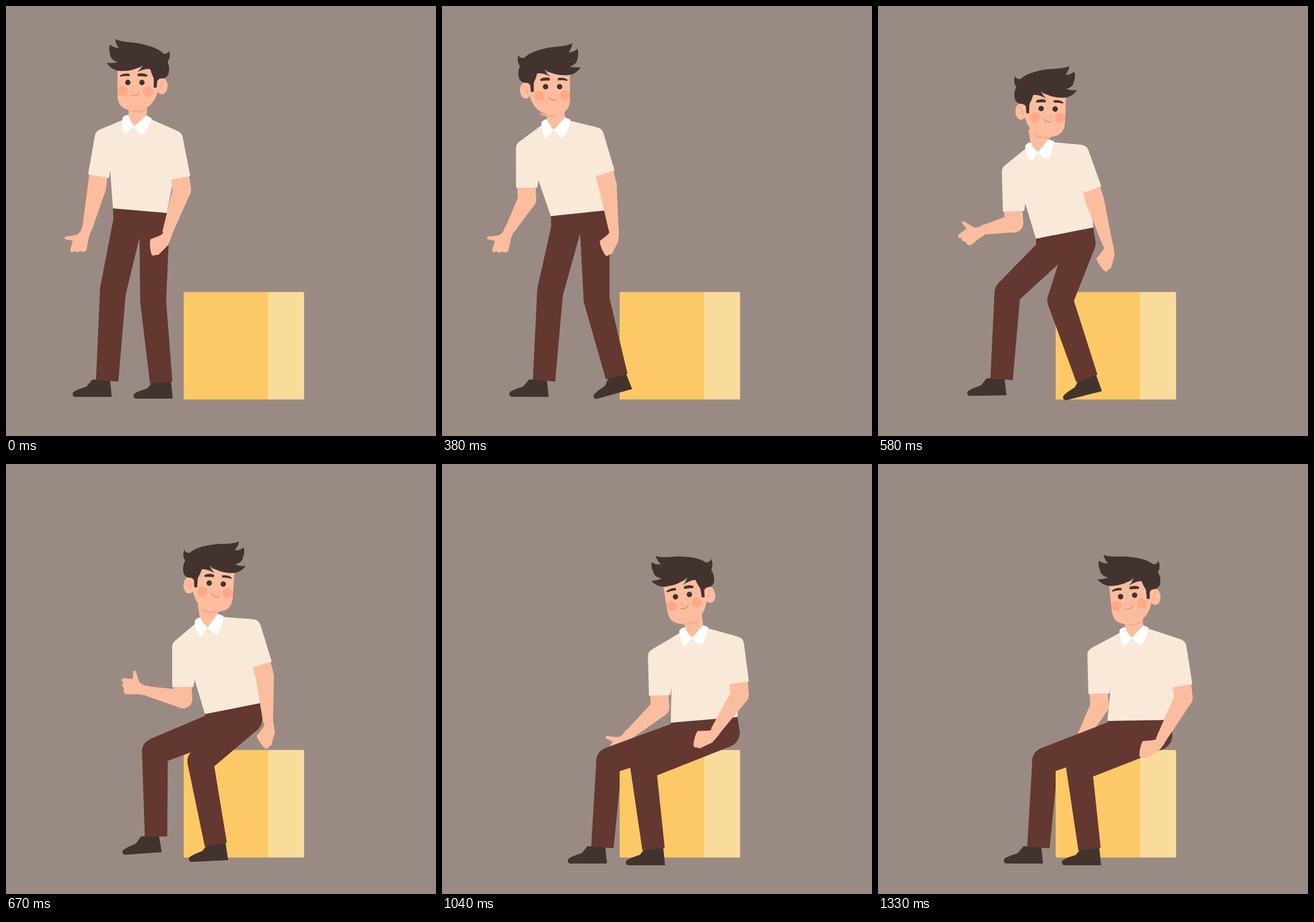
An HTML page with a canvas for the animation above (1.37 s loop, 748 by 748 pixels).

```html
<!DOCTYPE html>
<html lang="en">
<head>
<meta charset="utf-8">
<title>Sitting down</title>
<style>
  html, body { margin: 0; height: 100%; overflow: hidden; background: #998b83; }
  canvas { display: block; width: 100vw; height: 100vh; }
</style>
</head>
<body>
<canvas id="stage" width="748" height="748"></canvas>
<script>
const ctx = document.getElementById('stage').getContext('2d');
const LOOP = 1370, FPS = 24;
const SKIN = '#fcbd9f', BLUSH = '#fda988', SHIRT = '#f8e9d9', PANTS = '#623831', DARK = '#42332f';
const KEYS = [0, 5, 8, 12, 16, 20, 25, 32];

// Monotone cubic through one value per key
function curve(values) {
  const slope = values.slice(1).map((v, i) => (v - values[i]) / (KEYS[i + 1] - KEYS[i]));
  const tangent = values.map((_, i) => {
    const a = slope[i - 1] || 0, b = slope[i] || 0;
    return a * b > 0 ? 2 * a * b / (a + b) : 0;
  });
  return k => {
    let i = 0;
    while (i < KEYS.length - 2 && k >= KEYS[i + 1]) i++;
    const h = KEYS[i + 1] - KEYS[i], u = (k - KEYS[i]) / h, w = 1 - u;
    return values[i] * (1 + 2 * u) * w * w + values[i + 1] * u * u * (3 - 2 * u)
      + h * u * w * (tangent[i] * w - tangent[i + 1] * u);
  };
}
const track = (...channels) => {
  const curves = channels.map(curve);
  return k => curves.map(c => c(k));
};

// Channels: x, y and, where a part turns, its angle in degrees
const head = track([224, 201, 190, 222.5, 366, 387.5, 418, 434], [133, 133, 138, 152, 208, 230.5, 229, 229.5], [0, 0, 0, 0, 4, -12, -9.5, -6]);
const collar = track([222, 203, 192, 215, 350, 404, 434, 441], [209, 209, 213, 226, 284, 300, 302, 302], [3, 0, -3, -7, -9, -8, -5, -4]);
const shoulderL = track([156, 136, 127, 150, 289, 339, 358, 364], [218, 229, 237, 253, 312, 335, 327, 324], [-10, -3, -1, 3, 0, 2.5, 1.5, 1.5]);
const shoulderR = track([306, 286, 277, 297, 440, 495, 524, 535], [221, 214, 213, 219, 271, 295, 303, 308], [11, 12, 15, 21, 17, 8.5, 7.5, 9]);
const hemL = track([186, 182, 186, 211, 346, 396, 398, 399], [352, 358, 363, 377, 435, 457, 450, 447]);
const hemR = track([280, 277, 283, 316, 442, 510, 514, 508], [360, 355, 355, 359, 416, 432, 440, 445]);
const wristL = track([141, 129, 116, 137, 245, 301, 326, 350], [388, 389, 390, 386, 395, 416, 470, 485], [0, 2, 2, 2, 80, 80, 15, 0]);
const wristR = track([280, 287, 293, 338, 456, 480, 475, 491], [396, 392, 391, 392, 450, 478, 465, 481], [0, -8, -14, -28, -30, -13, 20, 17]);
const kneeL = track([186, 186, 187, 197, 259, 288, 291, 291], [496, 496, 497, 498, 500, 508, 516, 516]);
const kneeR = track([256, 256, 264, 292, 338, 350, 350, 350], [514, 514, 512, 508, 517, 520, 527, 529]);
const ankleL = track([176, 176, 177, 180, 261, 297, 279, 279], [652, 652, 652, 651, 648, 659, 667, 667], [0, 0, 0, 1, -4, -8, 0, 0]);
const ankleR = track([270, 270, 288, 360, 365, 367, 368, 368], [655, 655, 648, 636, 662, 668, 670, 670], [0, 0, -12, -24, -3, 0, 0, 0]);

const shape = d => new Path2D(d);
const SHOE = shape('M-14-2H17L20 28H-44Q-49 27-48 21Q-46 17-24 10Z');
const HAND_L = shape('M-8-6Q-10 6-18 10Q-28 12-37 13Q-41 16-37 18L-25 20L-29 36Q-29 41-25 40L-21 38Q-17 43-12 38Q-6 42-1 37L3 15L8 0Z');
const HAND_R = shape('M-5-6Q-6 1-14 4L-29 10Q-31 22-27 36Q-24 40-20 37L-15 37L2 20L9 2Z');
const NECK = shape('M-10-18V-42H21L22-18L0 3Z');
const COLLAR = shape('M-11-19Q-17-18-20-14Q-21 0-17 10Q-14 16-9 11L0 1L11 13Q15 16 19 11Q27 0 31-15L22-20L1 0Q-7-8-9-18Z');
// Head parts face left; the point between the eyes is 224,133
const FACE = shape('M194 108V155C194 173 204 182 224 182C244 182 258 170 264 149L268 108Z');
const HAIR = shape('M190 57Q196 62 225 64Q262 70 274 83Q281 84 284 78Q287 90 281 97Q286 108 282 120Q277 127 271 126Q265 126 263 131L262 142H257V126Q253 118 251 110Q244 108 228 115Q236 109 238 103Q222 114 198 113Q184 112 175 99Q184 100 194 98Q181 93 181 84Q178 74 181 67Q188 73 196 73Q190 64 190 57Z');
const BROWS = shape('M198 121Q205 116 215 118V122Q206 121 199 123ZM229 118Q239 115 246 120L245 123Q238 122 229 122Z');

function fill(color, path) {
  ctx.fillStyle = color;
  path ? ctx.fill(path) : ctx.fill();
}
function poly(color, points) {
  ctx.beginPath();
  points.forEach(p => ctx.lineTo(p[0], p[1]));
  fill(color);
}
function oval(color, x, y, rx, ry = rx) {
  ctx.beginPath();
  ctx.ellipse(x, y, rx, ry, 0, 0, 7);
  fill(color);
}
function line(color, width, d) {
  ctx.strokeStyle = color;
  ctx.lineWidth = width;
  ctx.stroke(shape(d));
}
function at([x, y, angle], draw) {
  ctx.save();
  ctx.translate(x, y);
  ctx.rotate(angle * Math.PI / 180);
  draw();
  ctx.restore();
}
// Tapered limb with a round start and a flat end
function limb(color, [x1, y1], r1, [x2, y2], r2) {
  const len = Math.hypot(x2 - x1, y2 - y1), nx = (y1 - y2) / len, ny = (x2 - x1) / len;
  oval(color, x1, y1, r1);
  poly(color, [[x1 + nx * r1, y1 + ny * r1], [x2 + nx * r2, y2 + ny * r2],
    [x2 - nx * r2, y2 - ny * r2], [x1 - nx * r1, y1 - ny * r1]]);
}
function sleeve([x, y, angle], side) {
  const a = angle * Math.PI / 180, s = Math.sin(a), c = Math.cos(a);
  const point = (along, across) => [x + along * s + across * side * c, y + along * c - across * side * s];
  return { top: [x, y], outer: point(76, 0), inner: point(76, 37), back: point(16, 37), mid: point(74, 18), elbow: point(97, 19) };
}
function forearm(arm, wrist, hand) {
  limb(SKIN, arm.mid, 16, arm.elbow, 16);
  limb(SKIN, arm.elbow, 16, wrist, 8.5);
  at(wrist, () => fill(SKIN, hand));
}
function shin(knee, ankle, offset) {
  at(ankle, () => {
    ctx.translate(offset, 0);
    fill(DARK, SHOE);
  });
  limb(PANTS, knee, 22.5, ankle, 19.5);
}
function drawHead(pose, flipped) {
  at(pose, () => {
    if (flipped) ctx.scale(-1, 1);
    ctx.translate(-224, -133);
    line(BLUSH, 3, 'M218 182Q232 186 245 180');
    oval(SKIN, 271, 139, 10, 14.5);
    line(BLUSH, 2, 'M268 144Q268 134 275 132');
    fill(SKIN, FACE);
    ctx.save();
    ctx.clip(FACE);
    oval(BLUSH, 203, 148, 9);
    oval(BLUSH, 247, 149, 9);
    ctx.restore();
    fill(DARK, HAIR);
    fill(DARK, BROWS);
    oval(DARK, 212, 133, 4.7);
    oval(DARK, 236.5, 133, 4.7);
    line(BLUSH, 2, 'M218 146Q219 149 222 148');
    line('#f48d6b', 1.8, 'M218 155Q227 158 231 151');
  });
}

function draw(k) {
  const neck = collar(k), left = sleeve(shoulderL(k), 1), right = sleeve(shoulderR(k), -1);
  const waistL = hemL(k), waistR = hemR(k);
  const hipL = [waistL[0] + 27, waistL[1] + 20], hipR = [waistR[0] - 22, waistR[1] + 27];
  const tilt = neck[2] * Math.PI / 180;
  const onNeck = (x, y) => [neck[0] + x * Math.cos(tilt) - y * Math.sin(tilt), neck[1] + x * Math.sin(tilt) + y * Math.cos(tilt)];
  const neckL = onNeck(-17, -11), neckR = onNeck(31, -13);

  ctx.fillStyle = '#998b83';
  ctx.fillRect(0, 0, 748, 748);
  shin(kneeL(k), ankleL(k), -12);
  ctx.fillStyle = '#fdc966';
  ctx.fillRect(309, 497.5, 147, 187);
  ctx.fillStyle = '#f9dc9c';
  ctx.fillRect(456, 497.5, 62.5, 187);

  forearm(left, wristL(k), HAND_L);
  limb(PANTS, hipL, 26, kneeL(k), 23);
  oval(PANTS, ...kneeL(k), 22.5);
  limb(PANTS, hipR, 26, kneeR(k), 22.5);
  shin(kneeR(k), ankleR(k), 0);
  poly(PANTS, [waistL, waistR, [hipR[0] + 26, hipR[1]], hipR, hipL, [hipL[0] - 26, hipL[1]]]);

  ctx.beginPath();
  ctx.moveTo(...neckL);
  ctx.arcTo(...left.top, ...left.outer, 14);
  [left.outer, left.inner, [left.inner[0] + 2, left.inner[1] - 13], waistL, waistR].forEach(p => ctx.lineTo(...p));
  ctx.arcTo(...right.top, ...neckR, 14);
  ctx.lineTo(...neckR);
  fill(SHIRT);

  forearm(right, wristR(k), HAND_R);
  ctx.beginPath();
  ctx.moveTo(...neckR);
  ctx.arcTo(...right.top, ...right.outer, 14);
  [right.outer, right.inner, right.back].forEach(p => ctx.lineTo(...p));
  fill(SHIRT);

  at(neck, () => fill(SKIN, NECK));
  drawHead(head(k), k >= 9 && k < 18);
  at(neck, () => fill('#fff', COLLAR));
}

ctx.lineCap = 'round';
function tick() {
  const t = performance.now() % LOOP;
  draw(Math.floor((t + 4.99) * FPS / 1000));
  requestAnimationFrame(tick);
}
tick();
</script>
</body>
</html>
```
